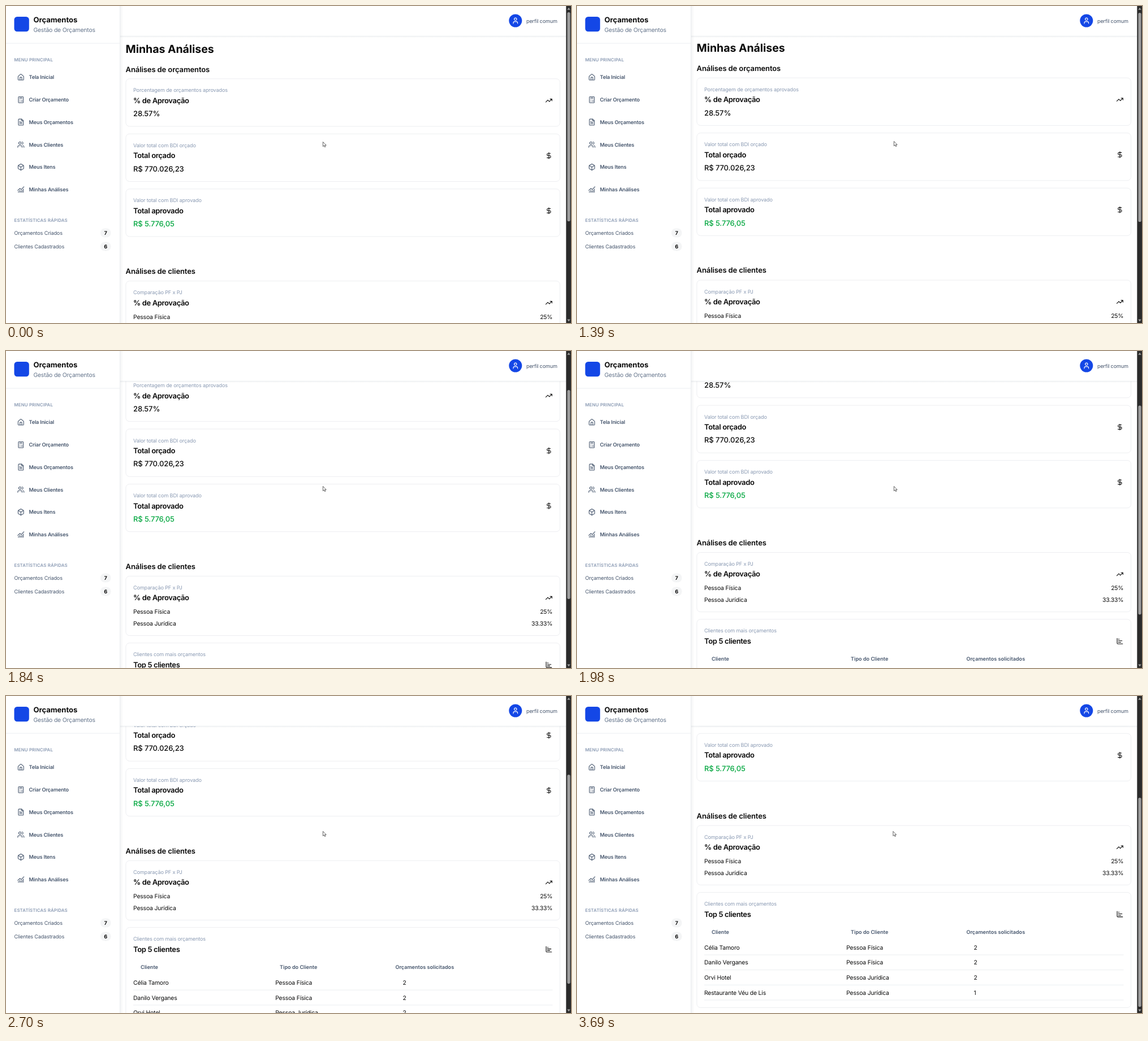
An HTML page for the animation above (3960 ms loop, 999 by 561 pixels).

```html
<!DOCTYPE html>
<html lang="pt-BR">
<head>
<meta charset="utf-8">
<title>Minhas Análises</title>
<style>
html, body { margin: 0; width: 100%; height: 100%; overflow: hidden; background: #fff; }
svg { display: block; width: 999px; height: 561px; }
text { font-family: Inter, "Open Sans", sans-serif; text-rendering: geometricPrecision; fill: #0a0a0a; white-space: pre; }
.h1 { font-size: 19.5px; font-weight: 700; letter-spacing: -.002em; }
.h2 { font-size: 13px; font-weight: 600; letter-spacing: -.008em; }
.brand { font-size: 13px; font-weight: 700; }
.tag { font-size: 10.4px; letter-spacing: -.017em; fill: #64748b; }
.group { font-size: 7.8px; font-weight: 600; letter-spacing: .022em; fill: #8a9ab3; }
.nav { font-size: 9.1px; font-weight: 600; letter-spacing: -.016em; fill: #45556c; }
.stat { font-size: 9.1px; letter-spacing: -.018em; fill: #45556c; }
.badge { font-size: 9.1px; font-weight: 700; text-anchor: middle; }
.label { font-size: 9.1px; letter-spacing: -.016em; fill: #8a9ab3; }
.title { font-size: 13px; font-weight: 600; letter-spacing: -.027em; }
.value { font-size: 13px; font-weight: 500; letter-spacing: -.009em; }
.green { fill: #00a63e; }
.cell { font-size: 10.4px; letter-spacing: -.016em; }
.end { text-anchor: end; }
.th { font-size: 9.1px; font-weight: 600; fill: #45556c; }
.icon { fill: none; stroke-width: 2; stroke-linecap: round; stroke-linejoin: round; }
.card { fill: #fff; stroke: #e7e9ed; stroke-width: .75; }
.rule { stroke: #e5e8ec; stroke-width: .75; }
</style>
</head>
<body>
<svg id="stage" viewBox="0 0 999 561" xmlns="http://www.w3.org/2000/svg"></svg>
<script>
const LOOP = 3960;
const BLUE = '#1447e6', SLATE = '#45556c', INK = '#0a0a0a';

const ICONS = {
  house: 'M15 21v-8a1 1 0 0 0-1-1h-4a1 1 0 0 0-1 1v8M3 10a2 2 0 0 1 .7-1.5l7-6a2 2 0 0 1 2.6 0l7 6A2 2 0 0 1 21 10v9a2 2 0 0 1-2 2H5a2 2 0 0 1-2-2z',
  calc: 'M6 2h12a2 2 0 0 1 2 2v16a2 2 0 0 1-2 2H6a2 2 0 0 1-2-2V4a2 2 0 0 1 2-2zM8 6h8M16 14v4M16 10h.01M12 10h.01M8 10h.01M12 14h.01M8 14h.01M12 18h.01M8 18h.01',
  file: 'M15 2H6a2 2 0 0 0-2 2v16a2 2 0 0 0 2 2h12a2 2 0 0 0 2-2V7zM14 2v4a2 2 0 0 0 2 2h4M10 9H8M16 13H8M16 17H8',
  users: 'M16 21v-2a4 4 0 0 0-4-4H6a4 4 0 0 0-4 4v2M5 7a4 4 0 1 0 8 0a4 4 0 1 0-8 0M22 21v-2a4 4 0 0 0-3-3.9M16 3.1a4 4 0 0 1 0 7.8',
  box: 'M21 8a2 2 0 0 0-1-1.7l-7-4a2 2 0 0 0-2 0l-7 4A2 2 0 0 0 3 8v8a2 2 0 0 0 1 1.7l7 4a2 2 0 0 0 2 0l7-4a2 2 0 0 0 1-1.7zM3.3 7l8.7 5 8.7-5M12 22V12',
  chart: 'M12 16v5M16 14v7M20 10v11M22 3l-9 9-4-4-7 7M4 18v3M8 14v7',
  user: 'M19 21v-2a4 4 0 0 0-4-4H9a4 4 0 0 0-4 4v2M8 7a4 4 0 1 0 8 0a4 4 0 1 0-8 0',
  trend: 'M22 7l-8.5 8.5-5-5L2 17M16 7h6v6',
  dollar: 'M12 2v20M17 5H9.5a3.5 3.5 0 0 0 0 7h5a3.5 3.5 0 0 1 0 7H6',
  bars: 'M3 3v16a2 2 0 0 0 2 2h16M7 16h8M7 11h12M7 6h3'
};

const text = (x, y, cls, s) => `<text x="${x}" y="${y}" class="${cls}">${s}</text>`;
const rect = (x, y, w, h, fill, rx = 0) => `<rect x="${x}" y="${y}" width="${w}" height="${h}" rx="${rx}" fill="${fill}"/>`;
const rule = (x1, x2, y) => `<path class="rule" d="M${x1} ${y}H${x2}"/>`;
// 13px icon centred on (cx, cy)
const icon = (name, cx, cy, color = INK) =>
  `<path class="icon" stroke="${color}" d="${ICONS[name]}" transform="translate(${cx - 6.5} ${cy - 6.5}) scale(${13 / 24})"/>`;

function card(y, h, label, title, glyph) {
  return `<rect class="card" x="211.9" y="${y}" width="767.6" height="${h}" rx="6.5"/>` +
    text(225, y + 23.6, 'label', label) + text(225, y + 43, 'title', title) +
    icon(glyph, 959.9, y + 38.5);
}

function pair(y, name, share) {
  return text(225, y, 'cell', name) + text(966.4, y, 'cell end', share);
}

function content() {
  const totals = [
    ['Porcentagem de orçamentos aprovados', '% de Aprovação', 'trend', '28.57%', ''],
    ['Valor total com BDI orçado', 'Total orçado', 'dollar', 'R$ 770.026,23', ''],
    ['Valor total com BDI aprovado', 'Total aprovado', 'dollar', 'R$ 5.776,05', ' green']
  ];
  const clients = [
    ['Célia Tamoro', 'Física', 2],
    ['Danilo Verganes', 'Física', 2],
    ['Orvi Hotel', 'Jurídica', 2],
    ['Restaurante Véu de Lis', 'Jurídica', 1]
  ];
  let s = text(211.6, 82.6, 'h1', 'Minhas Análises') + text(211.6, 116.5, 'h2', 'Análises de orçamentos');
  totals.forEach(([label, title, glyph, value, tone], i) => {
    const y = 128.8 + 97.5 * i;
    s += card(y, 84.2, label, title, glyph) + text(225, y + 66.4, 'value' + tone, value);
  });
  s += text(211.6, 474, 'h2', 'Análises de clientes') +
    card(486.7, 105.2, 'Comparação PF x PJ', '% de Aprovação', 'trend') +
    pair(553.5, 'Pessoa Física', '25%') + pair(574.4, 'Pessoa Jurídica', '33.33%') +
    card(605, 204, 'Clientes com mais orçamentos', 'Top 5 clientes', 'bars') +
    text(238, 678.1, 'th', 'Cliente') + text(484, 678.1, 'th', 'Tipo do Cliente') +
    text(688.4, 678.1, 'th', 'Orçamentos solicitados');
  clients.forEach(([name, kind, count], i) => {
    const y = 706.2 + 26.65 * i;
    s += text(225, y, 'cell', name) + text(476.2, y, 'cell', 'Pessoa ' + kind) +
      text(701.4, y, 'cell', count) + rule(225, 966.5, y + 9.4);
  });
  return s;
}

function sidebar() {
  const nav = [['house', 'Tela Inicial'], ['calc', 'Criar Orçamento'], ['file', 'Meus Orçamentos'],
    ['users', 'Meus Clientes'], ['box', 'Meus Itens'], ['chart', 'Minhas Análises']];
  const stats = [['Orçamentos Criados', 7], ['Clientes Cadastrados', 6]];
  let s = rect(0, 0, 201.5, 561, '#fff') + rect(201.5, 0, 6, 561, 'url(#side)') +
    rect(201, 0, .8, 561, '#e8eaee') + rect(14.5, 19, 26.3, 26.3, BLUE, 5.2) +
    text(48.4, 28.8, 'brand', 'Orçamentos') + text(48.4, 46, 'tag', 'Gestão de Orçamentos') +
    rule(0, 201, 66) + text(14.5, 98.2, 'group', 'MENU PRINCIPAL');
  nav.forEach(([glyph, name], i) => {
    const y = 126.1 + 39.74 * i;
    s += icon(glyph, 26.3, y, SLATE) + text(40.5, y + 3.2, 'nav', name);
  });
  s += text(14.5, 382.2, 'group', 'ESTATÍSTICAS RÁPIDAS');
  stats.forEach(([name, n], i) => {
    const y = 401.5 + 24 * i;
    s += text(14.5, y + 3.3, 'stat', name) + rect(166.8, y - 8, 18.8, 16, '#f4f5f6', 8) +
      text(176.2, y + 3.4, 'badge', n);
  });
  return s;
}

function topbar() {
  return rect(201.5, 0, 789, 53, '#fff') + rect(201.5, 53.6, 789, 3, 'url(#top)') + rule(201.5, 990.5, 53.3) +
    `<circle cx="900.8" cy="26" r="11.5" fill="${BLUE}"/>` + icon('user', 900.8, 26, '#fff') +
    text(920, 29.6, 'stat', 'perfil comum');
}

function scrollbar() {
  return rect(990.3, 0, 8.7, 561, '#2b2b2b') +
    '<path fill="#9f9f9f" d="M992.3 6.8L995 2.8L997.7 6.8ZM992.3 554.6L995 558.6L997.7 554.6Z"/>' +
    '<rect id="thumb" x="992.4" y="11" width="5.2" height="370" rx="2.6" fill="#9f9f9f"/>';
}

const shade = (id, dir) => `<linearGradient id="${id}" x1="0" y1="0" ${dir}>` +
  '<stop stop-color="#0f172a" stop-opacity=".05"/><stop offset="1" stop-color="#0f172a" stop-opacity="0"/></linearGradient>';

document.getElementById('stage').innerHTML =
  '<defs>' + shade('side', 'x2="1" y2="0"') + shade('top', 'x2="0" y2="1"') +
  '<clipPath id="view"><rect x="201" y="53" width="790" height="508"/></clipPath></defs>' +
  rect(0, 0, 999, 561, '#fff') +
  `<g clip-path="url(#view)"><g id="page">${content()}</g></g>` +
  topbar() + sidebar() + scrollbar() +
  '<path id="mouse" fill="#fff" stroke="#333" stroke-width=".75" stroke-linejoin="round" d="M0 0V8.1L1.9 6.4L3.2 9.2L4.5 8.6L3.3 5.9H5.8Z"/>';

const page = document.getElementById('page');
const thumb = document.getElementById('thumb');
const mouse = document.getElementById('mouse');

// Moments at which the screen is refreshed
const TICKS = [0, 430, 560, 1390, 1450, 1520, 1580, 1640, 1770, 1840, 1910, 1980,
  2500, 2570, 2630, 2700, 2900, 2970, 3100, 3560, 3690];
// Wheel notches: start, duration, distance
const NOTCHES = [[1368, 235, 65], [1748, 228, 65.2], [2478, 220, 65.1], [2878, 215, 62.2]];

const clamp = v => Math.min(1, Math.max(0, v));
const ease = p => p * p * (3 - 2 * p);
const moved = (t, start, len) => ease(clamp((t - start) / len));

function draw(ms) {
  const t = TICKS.filter(k => k <= ms).pop();
  const y = NOTCHES.reduce((sum, [start, len, d]) => sum + d * moved(t, start, len), 0);
  page.setAttribute('transform', `translate(0 ${-y.toFixed(2)})`);
  thumb.setAttribute('y', (11 + y * .6563).toFixed(2));
  const mx = 560.4 - 1.5 * moved(t, 3430, 260);
  const my = 240.5 - moved(t, 300, 260);
  mouse.setAttribute('transform', `translate(${mx.toFixed(2)} ${my.toFixed(2)})`);
}

const begin = performance.now();
function loop() {
  draw((performance.now() - begin) % LOOP);
  requestAnimationFrame(loop);
}
draw(0);
requestAnimationFrame(loop);
</script>
</body>
</html>
```
